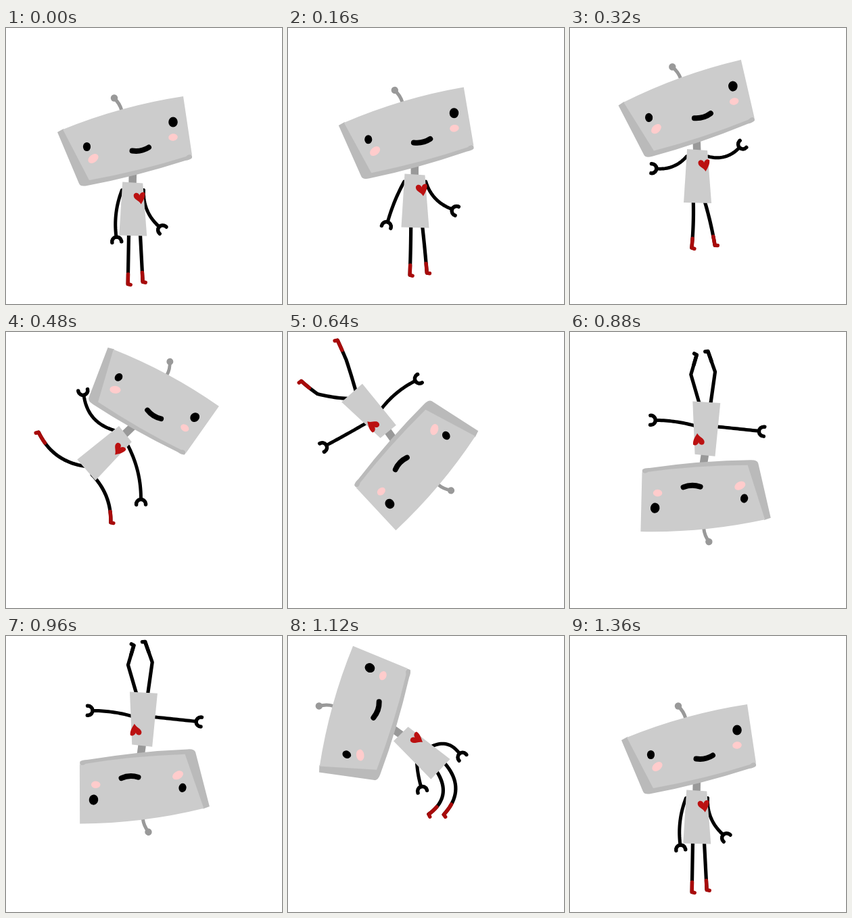
Write an HTML page with a canvas that moves like this. It is 408x408 px and loops after 1.44 s.

```html
<!DOCTYPE html>
<html lang="en">
<head>
<meta charset="utf-8">
<title>Robot somersault</title>
<style>
  html, body { margin: 0; width: 100%; height: 100%; overflow: hidden; background: #fff; }
  canvas { display: block; }
</style>
</head>
<body>
<canvas id="stage" width="408" height="408"></canvas>
<script>
const ctx = document.getElementById('stage').getContext('2d');
const STEP = 80, STEPS = 18;
const FACE = '#cccccc', SHADE = '#bababa', METAL = '#999999', BLUSH = '#ffcccc', RED = '#a80a0a';

// Head parts are drawn around HEAD, torso parts around BODY.
const HEAD = [183, 157.5], BODY = [188.25, 267];
// The neck joint, seen from the head and from the torso.
const CHIN = [4, 68], COLLAR = [-0.5, -42];
const SHOULDER = 16, HIPS = [[-6, 38], [11, 38]];

const rad = deg => deg * Math.PI / 180;
const add = (p, q) => [p[0] + q[0], p[1] + q[1]];
const sub = (p, q) => [p[0] - q[0], p[1] - q[1]];
const turn = ([x, y], deg) => {
  const c = Math.cos(rad(deg)), s = Math.sin(rad(deg));
  return [x * c - y * s, x * s + y * c];
};
const mix = (a, b, u) => Array.isArray(a) ? a.map((v, i) => mix(v, b[i], u)) : a + (b - a) * u;

// Each limb is [angle in the torso, reach, bow]; left one first.
const hanging = { shoulderY: -28, arms: [[97, 70, 4.5], [67, 59, 7]], legs: [[91, 73, 0], [87, 70, 0]], knee: 0 };
const cheering = { shoulderY: -29, arms: [[158, 48, -6], [-16, 48, 7]], legs: [[92, 68, -1], [77, 66, -1]], knee: 0 };
const flying = { shoulderY: -30, arms: [[182, 68, -11], [29, 81, -5]], legs: [[169, 84, -11], [21, 76, -8]], knee: 0 };
const spread = { shoulderY: 4, arms: [[184, 63, 0], [6, 59, 2]], legs: [[85, 77, 9], [85, 71, -10]], knee: 1 };
const tucked = { shoulderY: 7, arms: [[128, 36, 1], [62, 43, -9]], legs: [[149, 64, -15], [139, 76, -17]], knee: 0 };

const linear = u => u;
const easeIn = u => u * u;
const easeOut = u => 1 - (1 - u) ** 2;
const spring = u => 1 - (1 - u) ** 1.5;

// fall, if given, times the height of the head apart from the rest.
const keys = [
  { at: 0, head: HEAD, tilt: 0, lean: 0, limbs: hanging, ease: easeIn },
  { at: 4, head: [178.5, 109.5], tilt: -4.5, lean: 0, limbs: cheering, ease: linear },
  { at: 6, head: [222.5, 96.5], tilt: 43.7, lean: 47.6, size: 0.96, limbs: flying, ease: linear, fall: easeIn },
  { at: 9, head: [177, 336.5], tilt: 196.5, lean: 182, limbs: spread, ease: spring, squash: true },
  { at: 12, head: [195.5, 233], tilt: 188.3, lean: 182, limbs: spread, ease: linear, boots: '#000' },
  { at: 14, head: [104, 111.5], tilt: 300.9, lean: 312, limbs: tucked, ease: easeOut },
  { at: 17, head: HEAD, tilt: 360, lean: 360, limbs: hanging, ease: linear }
];

function stroke(path, width, color = '#000') {
  ctx.lineWidth = width;
  ctx.strokeStyle = color;
  ctx.stroke(new Path2D(path));
}

function fill(path, color) {
  ctx.fillStyle = color;
  ctx.fill(new Path2D(path));
}

const polyline = points => 'M' + points.map(p => p.join(' ')).join('L');

function oval(x, y, rx, ry, color, deg = 0) {
  ctx.beginPath();
  ctx.ellipse(x, y, rx, ry, rad(deg), 0, 7);
  ctx.fillStyle = color;
  ctx.fill();
}

function place(pos, deg, size, pivot, draw) {
  ctx.save();
  ctx.translate(...pos);
  ctx.rotate(rad(deg));
  ctx.scale(size, size);
  ctx.translate(-pivot[0], -pivot[1]);
  draw();
  ctx.restore();
}

// Points along a limb: an arc when knee is 0, a sharp joint when it is 1.
function limbPoints(root, [angle, reach, bow], knee = 0) {
  return Array.from({ length: 21 }, (_, i) => {
    const t = i / 20;
    const joint = Math.min(t / 0.6, (1 - t) / 0.4);
    return add(root, turn([reach * t, bow * mix(4 * t * (1 - t), joint, knee)], angle));
  });
}

function endAngle(points) {
  const [x, y] = sub(points.at(-1), points.at(-3));
  return Math.atan2(y, x) * 180 / Math.PI;
}

function drawArm(root, arm) {
  const points = limbPoints(root, arm), dir = endAngle(points), r = 7;
  stroke(polyline(points), 5);
  ctx.beginPath();
  ctx.arc(...add(points.at(-1), turn([r, 0], dir)), r, rad(dir + 85), rad(dir + 275));
  ctx.lineWidth = 5.5;
  ctx.stroke();
}

function drawLeg(root, leg, knee, boots) {
  const points = limbPoints(root, leg, knee);
  const toe = add(points.at(-1), turn([1, -4], endAngle(points)));
  stroke(polyline(points), 5.2);
  stroke(polyline([...points.slice(16), toe]), 5.5, boots);
}

function drawTorso() {
  fill('M173 227L203 229L209 307L168 306Z', FACE);
  fill('M198 247C197 242 189 242 189.5 248C190 253 197 254 200.5 260C204 254 207 249 206 243C203 241 199 243 198 247Z', '#bb1111');
}

function drawEye(x, y, rx, ry, squash) {
  if (squash) stroke(polyline([[x - rx, y + 2], [x + rx, y - 2]]), 8);
  else oval(x, y, rx, ry, '#000');
}

function drawHead(squash) {
  if (squash) {
    oval(167, 118, 7.5, 5, METAL, -16);
  } else {
    stroke('M171 122Q168 111 160 104', 5, METAL);
    oval(160, 103.5, 5.2, 5.2, METAL);
  }
  fill('M76 154L85 149L123 222Q200 211 266 188Q276 184 275 192Q272 195 265 196Q190 220 120 233Q110 235 108 230Z', SHADE);
  fill('M84 150Q170 115 262 101L275 188Q271 185 266 190Q200 211 123 225Z', FACE);
  oval(129, 193, 8.5, 5.8, BLUSH, -38);
  oval(247, 161.5, 6.8, 5.2, BLUSH, -8);
  stroke('M186.5 181.5Q200 183.5 211 176.5', 8);
  ctx.lineCap = 'butt';
  drawEye(119.5, 175.5, 5.6, 6.6, squash);
  drawEye(247, 139, 6.8, 7.6, squash);
}

function drawRobot({ head, tilt, lean, size, limbs, boots, squash }) {
  const neck = add(head, turn(CHIN, tilt));
  const body = sub(neck, turn(COLLAR, lean));

  place(body, lean, 1, [0, 0], () => {
    limbs.arms.forEach((arm, i) => drawArm([i ? SHOULDER : -SHOULDER, limbs.shoulderY], arm));
    limbs.legs.forEach((leg, i) => drawLeg(HIPS[i], leg, limbs.knee, boots));
  });
  ctx.lineCap = 'butt';
  stroke(polyline([add(body, turn([-0.5, -35], lean)), add(head, turn([4.5, 50], tilt))]), 11.5, METAL);
  ctx.lineCap = 'round';
  place(body, lean, 1, BODY, drawTorso);
  place(head, tilt, size, HEAD, () => drawHead(squash));
}

function poseAt(step) {
  const i = keys.findLastIndex(k => k.at <= step);
  const from = keys[i], to = keys[i + 1] ?? from;
  const u = to === from ? 0 : (step - from.at) / (to.at - from.at);
  const { ease, fall = ease } = from;
  const between = (a, b) => mix(a, b, ease(u));
  const limbs = {};
  for (const part in from.limbs) limbs[part] = between(from.limbs[part], to.limbs[part]);
  return {
    head: [between(from.head[0], to.head[0]), mix(from.head[1], to.head[1], fall(u))],
    tilt: between(from.tilt, to.tilt),
    lean: between(from.lean, to.lean),
    size: between(from.size ?? 1, to.size ?? 1),
    limbs,
    boots: (u < 0.5 ? from : to).boots ?? RED,
    squash: u === 0 && from.squash
  };
}

function tick() {
  ctx.fillStyle = '#fff';
  ctx.fillRect(0, 0, 408, 408);
  ctx.lineCap = ctx.lineJoin = 'round';
  drawRobot(poseAt(Math.floor(performance.now() / STEP) % STEPS));
  requestAnimationFrame(tick);
}
tick();
</script>
</body>
</html>
```
